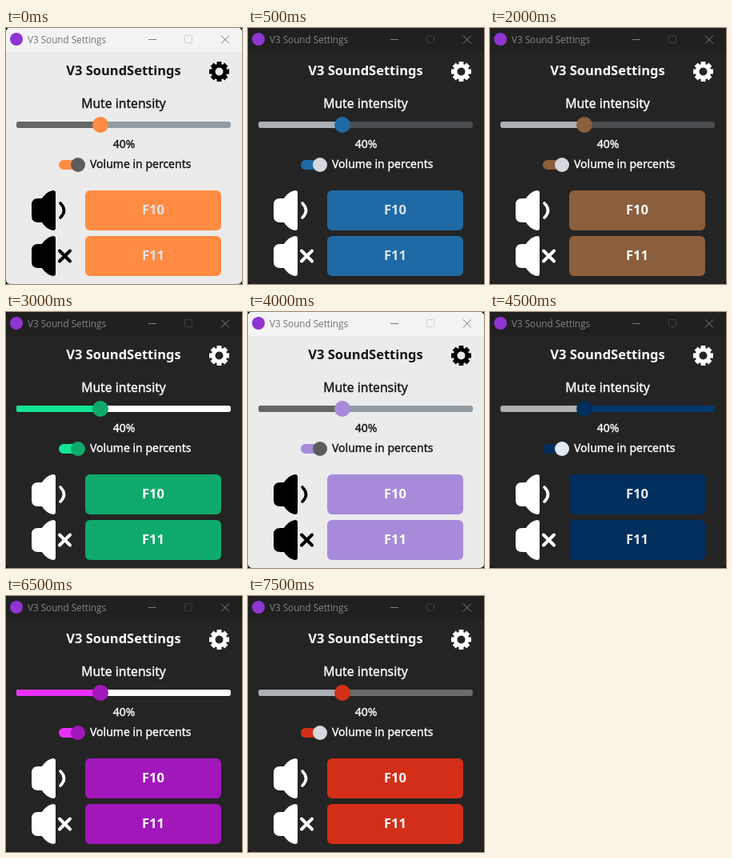
An HTML page that plays this animation: 295 px wide and 320 px high, repeating every 8 s.

```html
<!DOCTYPE html>
<html lang="en">
<head>
<meta charset="utf-8">
<title>V3 Sound Settings</title>
<style>
html, body { margin: 0; width: 100%; height: 100%; overflow: hidden; background: #111; }
svg {
  display: block; width: 295px; height: 320px; border-radius: 5px;
  font-family: "Noto Sans", "Open Sans", sans-serif;
  animation: mode 8s step-end infinite, theme 8s step-end infinite;
}
.bg { fill: var(--bg); }
.bar { fill: var(--bar); }
.caption { fill: var(--caption); font: 11.7px "Open Sans", sans-serif; }
.window { fill: none; stroke: var(--window); }
.off { stroke: var(--off); }
.icon { fill: var(--icon); }
.line { fill: none; stroke: var(--icon); stroke-linecap: round; }
.gear { fill: none; stroke: var(--icon); }
.text { fill: var(--text); }
.medium { stroke: var(--text); stroke-width: .35px; }
.mid { text-anchor: middle; }
.bold { font-weight: 700; font-size: 16.5px; }
.label { fill: var(--label); }
.accent { fill: var(--accent); }
.track { fill: var(--track); }
.progress { fill: var(--progress); }
.switch { fill: var(--switch); }
.knob { fill: var(--knob); }

/* Light and dark window */
@keyframes mode {
  0%, 12.5%, 50%, 62.5% {
    --bg: #ebebeb; --bar: #f3f3f3; --caption: #767676;
    --window: #777; --off: #d2d2d2; --icon: #000;
  }
  6.25%, 25%, 56.25%, 75%, 100% {
    --bg: #242424; --bar: #202020; --caption: #858585;
    --window: #7d7d7d; --off: #3c3c3c; --icon: #fff;
  }
}

/* Widget colours */
@keyframes theme {
  0%, 100% { --accent: #ff8c42; --switch: #ff8c42; --progress: #666; --track: #939ba2; --knob: #5c5c5c; --text: #141414; --label: #dce4ee; }
  6.25% { --accent: #1f6aa5; --switch: #1f6aa5; --progress: #aab0b5; --track: #4a4d50; --knob: #d5d9de; --text: #fff; --label: #dce4ee; }
  12.5% { --accent: #2cbe79; --switch: #2cbe79; --progress: #666; --track: #939ba2; --knob: #5c5c5c; --text: #141414; --label: #f0f4f8; }
  18.75% { --accent: #f6b2b3; --switch: #f6b2b3; --progress: #c4a2a2; --track: #d9a7a1; --knob: #704c70; --text: #704c70; --label: #fff8f5; }
  25% { --accent: #8b5e3c; --switch: #8b5e3c; --progress: #aab0b5; --track: #4a4d50; --knob: #d5d9de; --text: #fff; --label: #fff; }
  31.25% { --accent: #1f538d; --switch: #1f538d; --progress: #aab0b5; --track: #4a4d50; --knob: #d5d9de; --text: #fff; --label: #fff; }
  37.5% { --accent: #0eaa6b; --switch: #12e592; --progress: #12e592; --track: #fff; --knob: #0eaa6b; --text: #fff; --label: #fff; }
  43.75% { --accent: #2fa572; --switch: #2fa572; --progress: #aab0b5; --track: #4a4d50; --knob: #d5d9de; --text: #fff; --label: #fff; }
  50% { --accent: #a78bda; --switch: #a78bda; --progress: #666; --track: #939ba2; --knob: #5c5c5c; --text: #141414; --label: #fff; }
  56.25% { --accent: #002e5d; --switch: #002e5d; --progress: #b0b0b0; --track: #003a6c; --knob: #e4eaf2; --text: #fff; --label: #e8eef5; }
  62.5% { --accent: #e8789f; --switch: #e8789f; --progress: #a45c78; --track: #d8b4c0; --knob: #5c5c5c; --text: #141414; --label: #fff; }
  68.75% { --accent: #d13438; --switch: #d13438; --progress: #666; --track: #939ba2; --knob: #5c5c5c; --text: #141414; --label: #dce4ee; }
  75% { --accent: #1581c4; --switch: #2db6f5; --progress: #2db6f5; --track: #fff; --knob: #1581c4; --text: #fff; --label: #fff; }
  81.25% { --accent: #a217ba; --switch: #ea2ffa; --progress: #ea2ffa; --track: #fff; --knob: #a217ba; --text: #fff; --label: #fff; }
  87.5% { --accent: #c58b16; --switch: #c58b16; --progress: #aab0b5; --track: #4a4d50; --knob: #d5d9de; --text: #fff; --label: #fff; }
  93.75% { --accent: #d32f18; --switch: #d32f18; --progress: #aab0b5; --track: #6b6b6b; --knob: #d5d9de; --text: #fff; --label: #fff; }
}
</style>
</head>
<body>
<svg viewBox="0 0 295 320">
  <defs>
    <path id="speaker" d="M40 213H45C48 208 53 204 59 203Q62 203 62 206V250Q62 253 59 253C53 252 48 248 45 243H40Q32 243 32 235V221Q32 213 40 213Z"/>
    <rect id="button" x="99" y="203" width="170" height="50" rx="6"/>
  </defs>

  <rect class="bg" width="295" height="320"/>
  <rect class="bar" width="295" height="30"/>
  <circle cx="13" cy="14" r="8" fill="#8f35d2"/>
  <text class="caption" x="27" y="19">V3 Sound Settings</text>
  <g class="window">
    <path d="M178 14.5H188M269 9.5L279 19.5M279 9.5L269 19.5"/>
    <rect class="off" x="223.5" y="9.5" width="9" height="9" rx="1"/>
  </g>

  <text class="text mid bold" x="147" y="59">V3 SoundSettings</text>
  <g class="gear" transform="translate(266.5 54.5)">
    <circle r="7.4" stroke-width="4.8"/>
    <g stroke-width="5.8">
      <path id="teeth" d="M0 -12.5V-8M0 8V12.5M-12.5 0H-8M8 0H12.5"/>
      <use href="#teeth" transform="rotate(45)"/>
    </g>
  </g>

  <text class="text medium mid" x="147" y="100" font-size="15.7">Mute intensity</text>
  <rect class="track" x="13" y="117" width="268" height="8" rx="3"/>
  <path class="progress" d="M118 117H16Q13 117 13 120V122Q13 125 16 125H118Z"/>
  <circle class="accent" cx="118" cy="121" r="10"/>
  <text class="text medium mid" x="147.5" y="149.5" font-size="14">40%</text>

  <rect class="switch" x="66" y="165" width="32" height="12" rx="6"/>
  <circle class="knob" cx="90" cy="171" r="9"/>
  <text class="text medium" x="105" y="175" font-size="14">Volume in percents</text>

  <use class="icon" href="#speaker"/>
  <path class="line" stroke-width="3.6" d="M68 219Q77 228 68 237"/>
  <use class="accent" href="#button"/>
  <text class="label mid bold" x="184" y="233">F10</text>

  <use class="icon" href="#speaker" y="57"/>
  <path class="line" stroke-width="4" d="M67 278.5L80 291.5M80 278.5L67 291.5"/>
  <use class="accent" href="#button" y="57"/>
  <text class="label mid bold" x="184" y="290">F11</text>
</svg>
</body>
</html>
```
